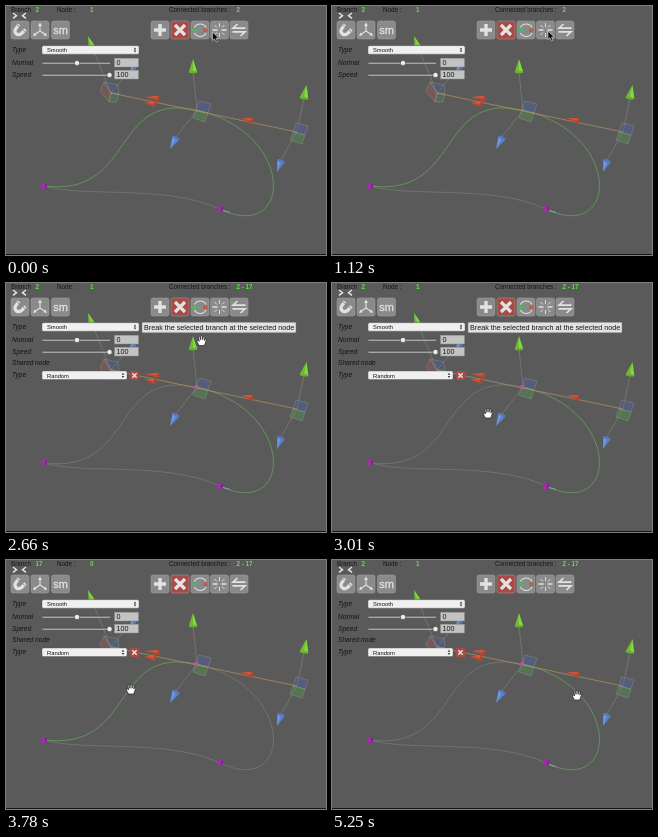
An HTML page that plays this animation: 320x249 px, repeating every 5.32 s.

```html
<!DOCTYPE html>
<html>
<head>
<meta charset="utf-8">
<style>
html, body { margin: 0; width: 100%; height: 100%; overflow: hidden; background: #5a5a5a; }
svg { display: block; width: 100vw; height: 100vh; font: 6.3px "Liberation Sans", Arial, sans-serif; }
.curve { fill: none; stroke: #7c7c7c; stroke-width: .7; }
.curve.on { stroke: #64a45b; stroke-width: .8; }
.stem { stroke: #85857c; stroke-width: .6; }
.val { fill: #55e83c; font-weight: bold; }
.label { font-size: 6.6px; font-style: italic; fill: #141414; }
.field { fill: #c3c3c3; stroke: #8a8a8a; stroke-width: .5; }
.glyph { fill: none; stroke: #e2e2e2; stroke-width: 1.5; }
</style>
</head>
<body>
<svg viewBox="0 0 320 249" preserveAspectRatio="none">
  <rect width="320" height="249" fill="#5a5a5a"/>
  <path d="M0 248.5H320" stroke="#161616"/>
  <path id="low" class="curve" d="M38 180C80 192 160 178 214 203"/>
  <path id="left" class="curve" d="M38 180C130 191 104 86 190 104"/>
  <path id="right" class="curve" d="M190 104C291 126 287 238 214 203"/>
  <g id="gizmos"></g>
  <path id="tip" d="M217 204.5L224 206.5" stroke="#9aa6d8" stroke-width=".8"/>
  <g id="header" fill="#151515">
    <text x="5" y="5.5">Branch</text><text id="branch" class="val" x="29.5" y="5.5"></text>
    <text x="51" y="5.5">Node :</text><text id="node" class="val" x="84" y="5.5"></text>
    <text x="163" y="5.5">Connected branches :</text><text id="linked" class="val" x="230.5" y="5.5"></text>
  </g>
  <path d="M7 7L10.5 9.7L7 12.4M20 7L16.5 9.7L20 12.4" class="glyph"/>
  <g id="buttons"></g>
  <g id="panel"></g>
  <g id="shared"></g>
  <g id="tooltip">
    <rect x="136" y="39.3" width="154" height="10.5" rx="1" fill="#e2e2e2" stroke="#777" stroke-width=".5"/>
    <text x="138" y="47" font-size="7.2" fill="#161616">Break the selected branch at the selected node</text>
  </g>
  <path id="arrow" d="M0 0V8.6L2 6.8L3.5 10L5 9.3L3.6 6.2H6.2Z" fill="#080808" stroke="#ddd" stroke-width=".6"/>
  <path id="hand" d="M-2.5 5L-4.7 1Q-5 -.4-3.4 0L-2.4 1L-3 -3.3Q-2.4 -4.5-1.5 -3.4L-1 -.7L-.8 -4.3Q0 -5.3 .8 -4.3L1 -.7L1.6 -3.7Q2.6 -4.5 3 -3.2L2.9 .1L3.7 -1.7Q4.8 -2 4.8 -.9L3.4 3L2.7 5Z" fill="#fff" stroke="#222" stroke-width=".7"/>
</svg>
<script>
const $ = id => document.getElementById(id);
const GREEN = '#84dc3e', BLUE = '#6c98ee', RED = '#d9553a', PALE = '#e4e6c8';
const LOOP = 5320, STEP = 70;

const line = (x, y, u, v) => `<path class="stem" d="M${x} ${y}L${u} ${v}"/>`;
const quad = (points, color, opacity = .4) =>
  `<polygon points="${points}" fill="${color}" fill-opacity="${opacity}" stroke="#a3a79f" stroke-opacity=".6" stroke-width=".5"/>`;

// A cone from its tip to the centre of its base
function cone(x, y, bx, by, width, color, id = '') {
  const length = Math.hypot(bx - x, by - y), angle = Math.atan2(by - y, bx - x) * 180 / Math.PI;
  return `<g id="${id}" fill="${color}" transform="translate(${x} ${y}) rotate(${angle})">
    <path d="M0 0L${length} ${-width}V${width}Z"/>
    <path d="M0 0L${length} 0V${width}Z" fill="#000" fill-opacity=".15"/>
    <ellipse cx="${length}" rx="1.3" ry="${width}"/>
    <ellipse cx="${length}" rx="1.3" ry="${width}" fill="#000" fill-opacity=".2"/></g>`;
}

function planes(x, y) {
  const at = points => points.map(([dx, dy]) => `${x + dx},${y + dy}`).join(' ');
  return quad(at([[2, -9], [14, -6], [11, 3], [-1, 0]]), '#4a62b0')
    + quad(at([[-1, 0], [11, 3], [8, 12], [-4, 8]]), '#4f9a4c');
}

const cube = (x, y) => `<path d="M${x - 2.5} ${y - 2}l1 -1h4v4l-1 2h-4z" fill="#a42bb0"/>
  <path d="M${x + 1.5} ${y + 3}v-5l1 -1v4z" fill="#641a70"/>`;

$('gizmos').innerHTML =
  [[105, 87, 86, 41], [105, 87, 126, 62], [191, 104, 187, 66], [191, 104, 170, 131],
   [291, 126, 298, 92], [291, 126, 275, 154]].map(p => line(...p)).join('')
  + quad('98,76 112,79 113,88 105,87', '#4a62b0', .3)
  + quad('98,76 105,87 103,96 94,85', '#a65a50', .35)
  + quad('105,87 113,88 111,96 103,96', '#4f9a4c', .3)
  + planes(191, 104) + planes(288, 126)
  + '<path d="M105 87L291 126" stroke="#b8935c" stroke-width=".7"/>'
  + cone(82, 30, 85.5, 40, 3, GREEN) + cone(187, 53, 187, 66, 4.2, GREEN)
  + cone(300.5, 79, 298, 92, 4.4, GREEN)
  + cone(124, 65, 128, 61, 3, BLUE) + cone(164, 143, 170, 132, 3.8, BLUE, 'handle')
  + cone(271, 166, 275, 155, 3.8, BLUE)
  + cone(139, 91, 152.5, 92.5, 2.8, RED) + cone(138, 96.5, 149, 98.5, 2.8, RED)
  + cone(235, 112, 246, 115, 2.8, RED)
  + cube(38, 180) + cube(214, 203)
  + '<rect id="joint" x="188.5" y="102" width="3.5" height="3.5" fill="#cf4a9c"/>';

const button = (x, glyph, color = '#8a8a8a') => `<g transform="translate(${x} 15)">
  <rect width="18" height="18" rx="2" fill="${color}" stroke="#a0a0a0" stroke-width=".5"/>${glyph}</g>`;
const glyph = (d, width = 1.5) => `<path class="glyph" d="${d}" style="stroke-width:${width}"/>`;

$('buttons').innerHTML =
  button(5, glyph('M8 3.5L4.5 8C2.5 12 7 15.5 10.5 12.5L14.5 8.5', 3.2)
    + '<path d="M6 4l3 2.5M11.5 8.5l3 2.5" stroke="#777" stroke-width=".8"/>')
  + button(25, glyph('M9 10V3M9 10L3 14M9 10L15 14', 1.1)
    + '<path d="M9 1.5l2 3.5h-4zM2 15l1.6 -3.5 2 2.8zM16 15l-1.6 -3.5 -2 2.8z" fill="#e2e2e2"/>')
  + button(45.5, '<text x="9" y="12.5" text-anchor="middle" font-size="11" fill="#e2e2e2" stroke="#e2e2e2" stroke-width=".3">sm</text>')
  + button(145, glyph('M9 3V15M3 9H15', 3.4))
  + button(165, glyph('M4 4L14 14M14 4L4 14', 3.2), '#a84a45')
  + button(185, glyph('M3.5 6.5A6.5 6.5 0 0 1 15 6.5M15 12A6.5 6.5 0 0 1 3.5 12', 1.1)
    + '<rect x="1.5" y="7.5" width="4.5" height="3.5" fill="#4fb568"/><rect x="12" y="7.5" width="4.5" height="3.5" fill="#c05a52"/>')
  + button(204.5, glyph('M2 9H7M11 9H16', 1.7) + glyph('M9 2V6M9 12V16M4 4L6.5 6.5M14 4L11.5 6.5M4 14L6.5 11.5M14 14L11.5 11.5', .9))
  + button(224, glyph('M15.5 7.2H3L7.5 3M2.5 10.8H15L10.5 15', 1.7));

const label = (text, y) => `<text class="label" x="6" y="${y}">${text}</text>`;
const select = (text, y, width) => `<rect x="36" y="${y}" width="${width}" height="8.5" rx="1.5" fill="#f0f0f0" stroke="#555" stroke-width=".4"/>
  <text x="41" y="${y + 6.5}" font-size="5.8" fill="#111">${text}</text>
  <path d="M${32 + width - 1.3} ${y + 3.7}l1.3 -2 1.3 2zm0 1.2l1.3 2 1.3 -2z" fill="#333"/>`;
const slider = (text, y, thumb, value) => label(text, y + 1.5)
  + `<path d="M36.5 ${y}H104" stroke="#bdbdbd" stroke-width="1.3"/><path d="M36.5 ${y - .8}H104" stroke="#3a3a3a" stroke-width=".6"/>
  <circle cx="${thumb}" cy="${y}" r="2.6" fill="#eee" stroke="#333" stroke-width=".5"/>
  <rect class="field" x="108.5" y="${y - 4.8}" width="24" height="8.8"/>
  <text x="110.5" y="${y + 2.2}" font-size="7.2" fill="#181818">${value}</text>`;

$('panel').innerHTML = label('Type', 45.5) + select('Smooth', 39.7, 97)
  + slider('Normal', 57, 71, 0) + slider('Speed', 69, 103.5, 100);
$('shared').innerHTML = label('Shared node', 81.5) + label('Type', 94.3) + select('Random', 88, 85)
  + '<rect x="124" y="88" width="9" height="9" rx="1" fill="#a84a45"/>'
  + glyph('M126.3 90.3L130.7 94.7M130.7 90.3L126.3 94.7');

// Pointer stops: time, x, y
const stops = [[0, 206.5, 26], [560, 216, 25], [1540, 214, 24], [2450, 214, 24], [3010, 156, 130],
  [3150, 156, 130], [3570, 125, 129], [4060, 125, 129], [4620, 245, 135], [LOOP, 245, 135]];

function pointer(t) {
  const i = stops.findIndex(s => s[0] > t);
  const [t0, x0, y0] = stops[i - 1], [t1, x1, y1] = stops[i];
  const k = t0 === 560 ? 0 : (t - t0) / (t1 - t0), e = k * k * (3 - 2 * k);
  return `translate(${x0 + (x1 - x0) * e} ${y0 + (y1 - y0) * e})`;
}

const show = (id, on) => $(id).style.display = on ? '' : 'none';

function draw(now) {
  const t = Math.floor(now % LOOP / STEP) * STEP;
  const split = t >= 1610, second = t >= 3640 && t < 4760, hand = t >= 1540;
  $('branch').textContent = second ? 17 : 2;
  $('node').textContent = second ? 0 : 1;
  $('linked').textContent = split ? '2 - 17' : '2';
  $('left').classList.toggle('on', !split || second);
  $('right').classList.toggle('on', !second);
  show('tip', !second);
  show('shared', split);
  show('joint', split);
  show('tooltip', t >= 2170 && t < 3080);
  $('handle').setAttribute('fill', t >= 4340 && t < 4690 ? PALE : BLUE);
  show('arrow', !hand);
  show('hand', hand);
  $(hand ? 'hand' : 'arrow').setAttribute('transform', pointer(t));
}

const start = performance.now();
function tick() {
  draw(performance.now() - start);
  requestAnimationFrame(tick);
}
tick();
</script>
</body>
</html>
```
